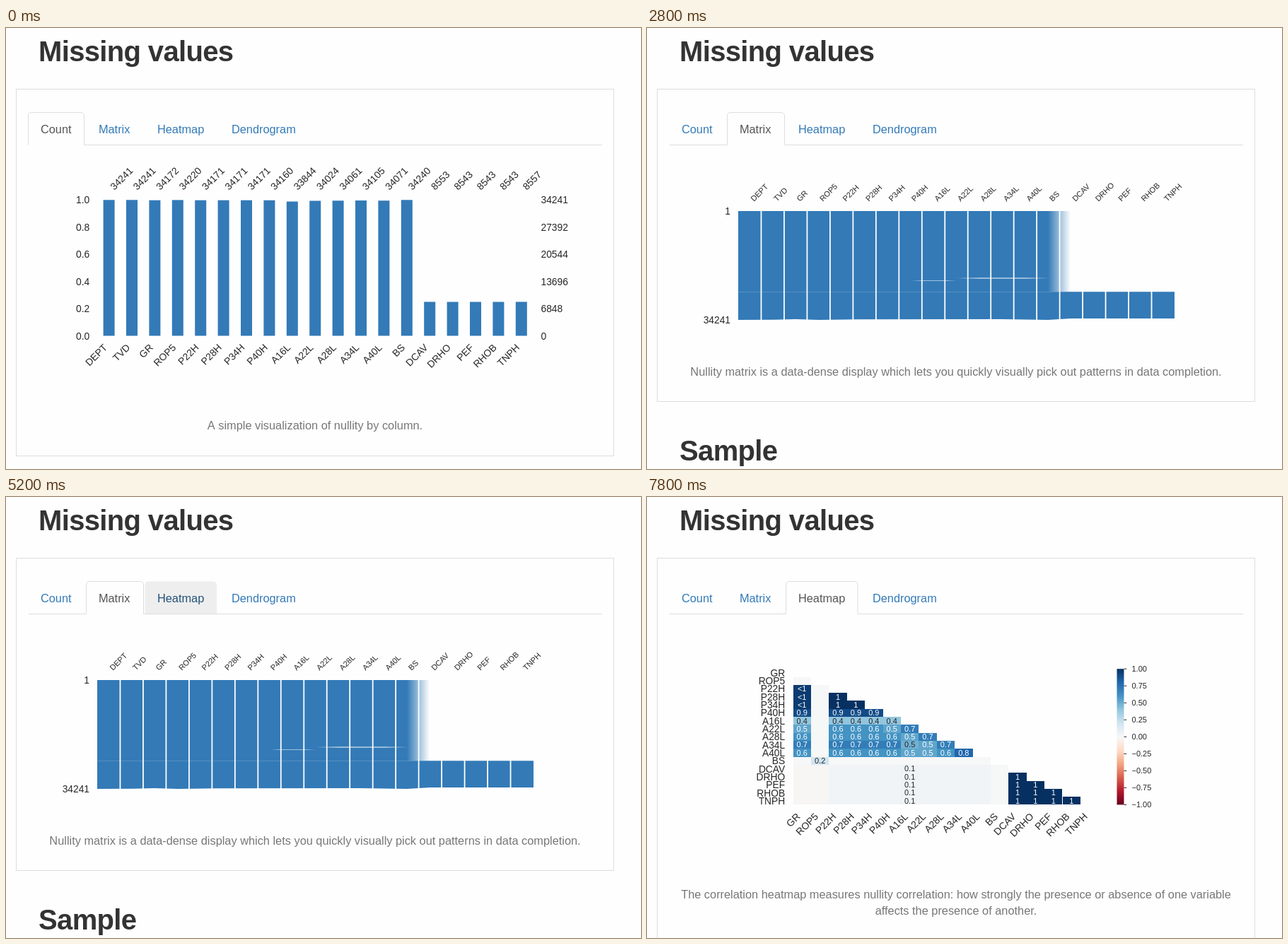
Recreate the animation shown at these times as an HTML page with a canvas. Size 898 by 624 pixels, loop 8 s.

```html
<!DOCTYPE html>
<html lang="en">
<head>
<meta charset="utf-8">
<title>Missing values</title>
<style>
html, body { margin: 0; width: 100%; height: 100%; overflow: hidden; background: #fefefe; }
canvas { display: block; width: 898px; height: 624px; }
</style>
</head>
<body>
<canvas id="stage"></canvas>
<script>
const W = 898, H = 624, LOOP = 8000;
const canvas = document.getElementById('stage');
const ctx = canvas.getContext('2d');
const ratio = window.devicePixelRatio || 1;
canvas.width = W * ratio;
canvas.height = H * ratio;

const PAPER = '#fefefe', BLUE = '#337ab7', INK = '#262626', RULE = '#dddddd';
const FACE = '"Liberation Sans", Arial, sans-serif';
const BODY = 16.35, LABEL = 13.8, SMALL = 11;

const names = 'DEPT TVD GR ROP5 P22H P28H P34H P40H A16L A22L A28L A34L A40L BS DCAV DRHO PEF RHOB TNPH'.split(' ');
const counts = [34241, 34241, 34172, 34220, 34171, 34171, 34171, 34160, 33844, 34024,
  34061, 34105, 34071, 34240, 8553, 8543, 8543, 8543, 8557];
const TOTAL = 34241;

const tabs = [
  { name: 'Count', x: 31.5, w: 79 },
  { name: 'Matrix', x: 113.5, w: 81 },
  { name: 'Heatmap', x: 196.5, w: 101.5 },
  { name: 'Dendrogram', x: 301.5, w: 125 }
];

// Each view lasts until its end time; hover begins at a set time.
const views = [
  { end: 2800, tab: 0, hover: 1, hoverAt: 1200, bottom: 605.5, draw: drawCount },
  { end: 6600, tab: 1, hover: 2, hoverAt: 3600, bottom: 528.5, draw: drawMatrix },
  { end: LOOP, tab: 2, hover: -1, hoverAt: LOOP, bottom: 700, draw: drawHeatmap }
];

function text(str, x, y, { size = LABEL, color = INK, align = 'left', weight = 'normal' } = {}) {
  ctx.font = `${weight} ${size}px ${FACE}`;
  ctx.fillStyle = color;
  ctx.textAlign = align;
  ctx.fillText(str, x, y);
}

function slanted(str, x, y, style) {
  ctx.save();
  ctx.translate(x, y);
  ctx.rotate(-Math.PI / 4);
  text(str, 0, 0, style);
  ctx.restore();
}

function rect(x, y, w, h, color) {
  ctx.fillStyle = color;
  ctx.fillRect(x, y, w, h);
}

function heading(str, y) {
  ctx.letterSpacing = '-0.65px';
  text(str, 46, y, { size: 40, color: '#333', weight: 'bold' });
  ctx.letterSpacing = '0px';
}

function caption(str, y) {
  text(str, 437, y, { size: BODY, color: '#777', align: 'center' });
}

function tabShape({ x, w }) {
  const top = 119.5, base = 165.5, r = 4.5;
  ctx.beginPath();
  ctx.moveTo(x, base);
  ctx.arcTo(x, top, x + r, top, r);
  ctx.arcTo(x + w, top, x + w, top + r, r);
  ctx.lineTo(x + w, base);
}

function drawTabs(active, hover) {
  rect(32, 165, 811, 1, RULE);
  tabs.forEach((tab, i) => {
    let color = BLUE;
    if (i === hover) {
      tabShape(tab);
      ctx.fillStyle = '#eeeeee';
      ctx.fill();
      rect(tab.x, 165, tab.w, 1, RULE);
      color = '#23527c';
    }
    if (i === active) {
      tabShape(tab);
      ctx.fillStyle = PAPER;
      ctx.fill();
      rect(tab.x, 165, tab.w, 1, PAPER);
      tabShape(tab);
      ctx.strokeStyle = RULE;
      ctx.lineWidth = 1;
      ctx.stroke();
      color = '#555';
    }
    text(tab.name, tab.x + 17.4, 149, { size: BODY, color });
  });
}

function drawCount() {
  const base = 435.5, full = 192.2, pitch = 32.4;
  names.forEach((name, i) => {
    const x = 145.6 + i * pitch, h = full * counts[i] / TOTAL;
    rect(x - 8, base - h, 16, h, BLUE);
    slanted(counts[i], x + 7.6, 230, {});
    slanted(name, x - 1.7, 453, { align: 'right' });
  });
  for (let i = 0; i <= 5; i++) {
    const y = base - full * i / 5 + 5;
    text((i / 5).toFixed(1), 118.2, y, { align: 'right' });
    text(Math.floor(TOTAL * i / 5), 756.5, y);
  }
  caption('A simple visualization of nullity by column.', 568);
}

function drawMatrix() {
  const left = 129, right = 746, top = 259, step = 373.3;
  const pitch = (right - left) / names.length;

  const fade = ctx.createLinearGradient(567, 0, 599, 0);
  fade.addColorStop(0, BLUE);
  fade.addColorStop(1, PAPER);
  rect(left, top, 470, step - top, fade);

  // The lower edge is slightly uneven.
  const edge = [[746, 411], [600, 411], [567, 413], [500, 412], [300, 412.3], [243, 413],
    [210, 412], [180, 412.8], [129, 413]];
  ctx.beginPath();
  ctx.moveTo(left, step);
  ctx.lineTo(right, step);
  edge.forEach(p => ctx.lineTo(...p));
  ctx.fillStyle = BLUE;
  ctx.fill();

  hairline(374, 438, 357.5, 0.55);
  hairline(438, 568, 354, 1);

  names.forEach((name, i) => {
    const x = left + i * pitch;
    if (i) rect(x - 0.9, top - 1, 1.8, 156, PAPER);
    slanted(name, x + 22.3, 246, { size: SMALL });
  });
  text('1', 118, 264, { align: 'right' });
  text(TOTAL, 118, 418, { align: 'right' });
  caption('Nullity matrix is a data-dense display which lets you quickly visually pick out patterns in data completion.', 491.5);
  heading('Sample', 612);
}

function hairline(x1, x2, y, strength) {
  const g = ctx.createLinearGradient(x1, 0, x2, 0);
  g.addColorStop(0, 'rgba(254,254,254,0)');
  g.addColorStop(0.25, `rgba(254,254,254,${strength})`);
  g.addColorStop(0.75, `rgba(254,254,254,${strength})`);
  g.addColorStop(1, 'rgba(254,254,254,0)');
  rect(x1, y - 0.5, x2 - x1, 1, g);
}

// Diverging scale from -1 to 1.
const scale = ['67001f', 'b2182b', 'd6604d', 'f4a582', 'fddbc7', 'f7f7f7',
  'd1e5f0', '92c5de', '4393c3', '2166ac', '053061'];

function heatColor(v) {
  const p = (v + 1) * 5, i = Math.min(9, Math.floor(p)), f = p - i;
  const channel = (hex, k) => parseInt(hex.slice(k, k + 2), 16);
  const mix = [0, 2, 4].map(k =>
    Math.round(channel(scale[i], k) * (1 - f) + channel(scale[i + 1], k) * f));
  return `rgb(${mix})`;
}

// One mark per cell: a digit is tenths, x is one, < is just below one,
// s and o are lighter 0.5 and 0.1, a dot has no label.
const weak = '......o.....';
const heat = ['', '.', '<.', '<.x', '<.xx', '9.999', '4.4444', '5.66657', '6.666657',
  '7.7777s57', '6.66665568', '.2.........', weak, weak + 'x', weak + 'xx', weak + 'xxx', weak + 'xxxx'];
const special = { x: [1, '1'], '<': [0.96, '<1'], s: [0.48, '0.5'], o: [0.05, '0.1'], 5: [0.53, '0.5'] };

function cell(mark, row, col) {
  if (mark === '.') {
    const tinted = row > 11 && col < 11;
    return [tinted ? (col < 2 ? -0.01 : 0.035) : 0.005, ''];
  }
  return special[mark] || [mark / 10, '0.' + mark];
}

function drawHeatmap() {
  const left = 206.5, top = 243.2, cw = 25.4, ch = 11.31;
  names.slice(2).forEach((name, row) => {
    const y = top + row * ch, mid = y + ch / 2;
    const y0 = Math.round(y), y1 = Math.round(y + ch);
    [...heat[row]].forEach((mark, col) => {
      const [v, label] = cell(mark, row, col);
      const x = left + col * cw, x0 = Math.round(x), x1 = Math.round(x + cw);
      rect(x0, y0, x1 - x0, y1 - y0, heatColor(v));
      text(label, x + cw / 2, mid + 3.8, { size: SMALL, align: 'center', color: v < 0.5 ? INK : '#fff' });
    });
    text(name, 195.2, mid + 5, { align: 'right' });
    slanted(name, left + (row + 0.5) * cw - 1.7, 453, { align: 'right' });
  });

  const h = 192.2, bar = ctx.createLinearGradient(0, top + h, 0, top);
  scale.forEach((hex, i) => bar.addColorStop(i / 10, '#' + hex));
  rect(664.5, top, 10, h, bar);
  for (let i = 0; i <= 8; i++) {
    const v = 1 - i / 4, y = top + h * i / 8;
    rect(674.5, y - 0.5, 3.7, 1, INK);
    text((v < 0 ? '\u2212' : '') + Math.abs(v).toFixed(2), 685.5, y + 3.9, { size: SMALL });
  }
  caption('The correlation heatmap measures nullity correlation: how strongly the presence or absence of one variable', 568);
  caption('affects the presence of another.', 591);
}

function draw(t) {
  const view = views.find(v => t < v.end);
  ctx.setTransform(ratio, 0, 0, ratio, 0, 0);
  rect(0, 0, W, H, PAPER);
  heading('Missing values', 47);
  ctx.strokeStyle = RULE;
  ctx.lineWidth = 1;
  ctx.strokeRect(14.5, 86.5, 845, view.bottom - 86.5);
  drawTabs(view.tab, t >= view.hoverAt ? view.hover : -1);
  view.draw();
}

const start = performance.now();
function tick() {
  draw((performance.now() - start) % LOOP);
  requestAnimationFrame(tick);
}
tick();
</script>
</body>
</html>
```
